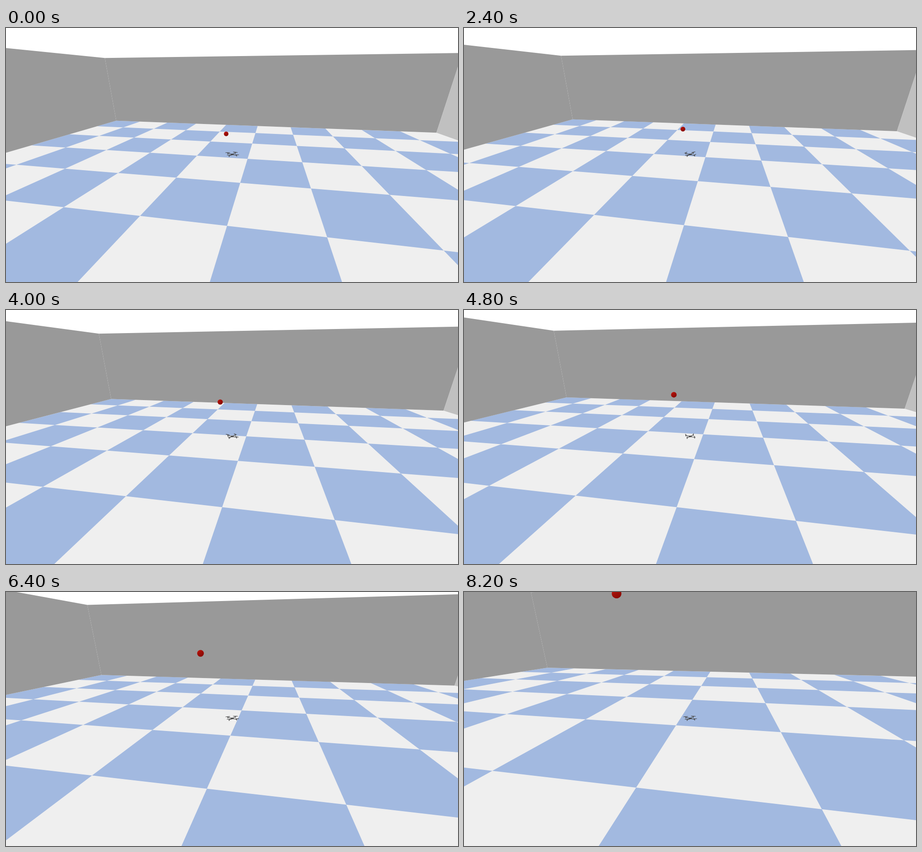
An HTML page with a canvas for the animation above (8300 ms loop, 998 by 561 pixels).

```html
<!DOCTYPE html>
<html lang="en">
<head>
<meta charset="utf-8">
<title>Drone chase camera</title>
<style>
  html, body { margin: 0; width: 100%; height: 100%; overflow: hidden; background: #fff; }
  canvas { display: block; }
</style>
</head>
<body>
<canvas id="stage" width="998" height="561"></canvas>
<script>
const ctx = document.getElementById('stage').getContext('2d');
const W = 998, H = 561, CX = W / 2, CY = H / 2;
const LOOP = 8300, STEP = 100;
const rad = deg => deg * Math.PI / 180;
const FOCAL = CY / Math.tan(rad(30));
const [sinYaw, cosYaw] = [Math.sin(rad(10)), Math.cos(rad(10))];
const [sinPitch, cosPitch] = [Math.sin(rad(20)), Math.cos(rad(20))];
const NEAR = 0.03, ROOM = 4.9, WALL = 2;
const BALL = [0, 0, 0.997], BALL_RADIUS = 0.0206;
const BLUE = '#a2b9e0', PALE = '#efefef', GREY = '#999999', LIGHT = '#c0c0c0';

// Camera path: seconds, then x, y, z in floor tiles
const PATH = [
  [0, 0.3857, -1.8853, 1.495],
  [1.6, 0.3831, -1.861, 1.4675],
  [3.2, 0.3848, -1.7588, 1.39],
  [4.8, 0.4, -1.5835, 1.2588],
  [6.4, 0.4335, -1.3484, 1.08],
  [7.2, 0.4557, -1.2049, 0.9705],
  [8.2, 0.4949, -0.9977, 0.8145]
];

const slope = (a, b, axis) => (b[axis] - a[axis]) / (b[0] - a[0]);

function tangent(i, axis) {
  const last = PATH.length - 1;
  if (i === 0) return 0;
  if (i === last) return 2 * slope(PATH[i - 1], PATH[i], axis) - tangent(i - 1, axis);
  return slope(PATH[i - 1], PATH[i + 1], axis);
}

function cameraAt(sec) {
  let i = 0;
  while (i < PATH.length - 2 && sec > PATH[i + 1][0]) i++;
  const a = PATH[i], b = PATH[i + 1], span = b[0] - a[0];
  const u = (sec - a[0]) / span, v = 1 - u;
  return [1, 2, 3].map(axis =>
    v * v * (1 + 2 * u) * a[axis] + u * u * (3 - 2 * u) * b[axis] +
    span * u * v * (v * tangent(i, axis) - u * tangent(i + 1, axis)));
}

function toView(p, cam) {
  const dx = p[0] - cam[0], dy = p[1] - cam[1], dz = p[2] - cam[2];
  const ahead = dy * cosYaw - dx * sinYaw;
  return [
    dx * cosYaw + dy * sinYaw,
    ahead * sinPitch + dz * cosPitch,
    ahead * cosPitch - dz * sinPitch
  ];
}

const toScreen = ([x, y, z]) => [CX + FOCAL * x / z, CY - FOCAL * y / z];

function clipNear(points) {
  const out = [];
  points.forEach((a, i) => {
    const b = points[(i + 1) % points.length];
    if (a[2] >= NEAR) out.push(a);
    if ((a[2] >= NEAR) !== (b[2] >= NEAR)) {
      const k = (NEAR - a[2]) / (b[2] - a[2]);
      out.push(a.map((v, n) => v + (b[n] - v) * k));
    }
  });
  return out;
}

function polygon(points, cam, color) {
  const shape = clipNear(points.map(p => toView(p, cam)));
  if (shape.length < 3) return;
  ctx.beginPath();
  shape.forEach(p => ctx.lineTo(...toScreen(p)));
  ctx.fillStyle = color;
  ctx.fill();
}

function floorRect(x0, y0, x1, y1, cam, color) {
  polygon([[x0, y0, 0], [x1, y0, 0], [x1, y1, 0], [x0, y1, 0]], cam, color);
}

function wall(x0, y0, x1, y1, cam, color) {
  polygon([[x0, y0, 0], [x1, y1, 0], [x1, y1, WALL], [x0, y0, WALL]], cam, color);
}

function drawRoom(cam) {
  const edge = v => Math.max(-ROOM, Math.min(ROOM, v));
  floorRect(-ROOM, -ROOM, ROOM, ROOM, cam, PALE);
  for (let i = -5; i < 5; i++)
    for (let j = -5; j < 5; j++)
      if ((i + j) % 2) floorRect(edge(i), edge(j), edge(i + 1), edge(j + 1), cam, BLUE);
  wall(-ROOM, -ROOM, -ROOM, ROOM, cam, GREY);
  wall(-ROOM, ROOM, ROOM, ROOM, cam, GREY);
  wall(ROOM, ROOM, ROOM, -ROOM, cam, LIGHT);
}

function drawBall(cam) {
  const view = toView(BALL, cam);
  const [x, y] = toScreen(view);
  const r = FOCAL * BALL_RADIUS / view[2];
  const shade = ctx.createLinearGradient(x - r * 0.6, y - r * 0.8, x + r * 0.5, y + r * 0.7);
  shade.addColorStop(0, '#bd140d');
  shade.addColorStop(0.35, '#a30f08');
  shade.addColorStop(1, '#8c0b05');
  ctx.fillStyle = shade;
  ctx.beginPath();
  ctx.arc(x, y, r, 0, 2 * Math.PI);
  ctx.fill();
}

function line(x0, y0, x1, y1) {
  ctx.beginPath();
  ctx.moveTo(x0, y0);
  ctx.lineTo(x1, y1);
  ctx.stroke();
}

function drawDrone(step) {
  ctx.save();
  ctx.translate(499.5, 279.2);
  ctx.strokeStyle = '#484848';
  ctx.fillStyle = '#404040';
  for (let k = 0; k < 4; k++) {
    const arm = rad(35 + 90 * k);
    const x = 12 * Math.cos(arm), y = 12 * Math.sin(arm) * sinPitch;
    const spin = step * 2.45 + (k % 2) * 0.3;
    const px = 5 * Math.cos(spin), py = 5 * Math.sin(spin) * sinPitch;
    ctx.lineWidth = 1.1;
    line(0, 0, x, y);
    line(x - px, y - 1.5 - py, x + px, y - 1.5 + py);
    ctx.lineWidth = 1.5;
    line(x, y - 2, x, y + 2);
  }
  ctx.fillRect(-3, -1.5, 6, 3);
  ctx.restore();
}

function render(now) {
  const step = Math.floor((now % LOOP) / STEP);
  const cam = cameraAt(step * STEP / 1000);
  ctx.fillStyle = '#fff';
  ctx.fillRect(0, 0, W, H);
  drawRoom(cam);
  drawBall(cam);
  drawDrone(step);
}

let start;
function tick(now) {
  start ??= now;
  render(now - start);
  requestAnimationFrame(tick);
}
render(0);
requestAnimationFrame(tick);
</script>
</body>
</html>
```
